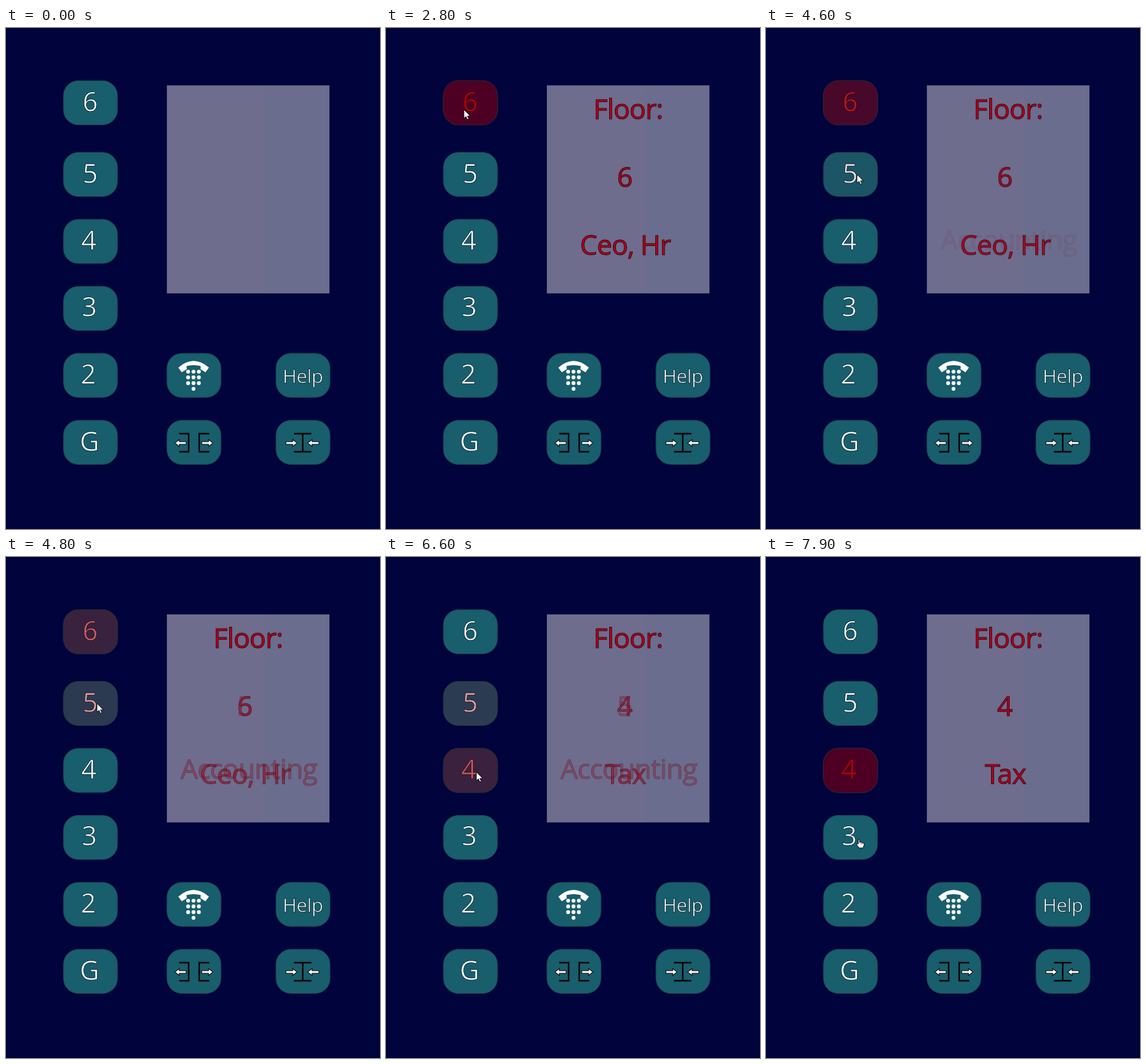
Recreate the animation shown at these times as an HTML page. Size 600 by 804 pixels, loop 8 s.

```html
<!DOCTYPE html>
<html lang="en">
<head>
<meta charset="utf-8">
<title>Lift panel</title>
<style>
  html, body { margin: 0; width: 100%; height: 100%; overflow: hidden; background: #01033c; }
  svg { display: block; width: 600px; height: 804px; }
  text { font-family: "Open Sans", "Noto Sans", sans-serif; text-anchor: middle; }
  .key { fill: #185e6c; stroke: #143c42; }
  .label { font-size: 43px; fill: #fff; stroke: #0c2a33; stroke-width: .8px; }
  .help { font-size: 31px; letter-spacing: -.6px; }
  .lit .key { fill: #4d0024; stroke: #302426; }
  .lit .label { fill: #b00606; stroke: #4d0018; }
  .info { font-size: 44px; letter-spacing: -.9px; fill: #b0001a; stroke: #3a0614; stroke-width: 1px; }
  .door { fill: none; stroke: #000; stroke-width: 2.4; }
  .arrow { fill: #fff; stroke: #111; stroke-width: 1.2; }
</style>
</head>
<body>
<svg viewBox="0 0 600 804">
  <defs>
    <linearGradient id="glass">
      <stop offset=".58" stop-color="#6e6d8e"/>
      <stop offset=".63" stop-color="#6a6d8d"/>
    </linearGradient>
    <path id="go" class="arrow" d="M0 -2.200H11V-5.500L18 0L11 5.500V2.200H0Z"/>
  </defs>
  <rect width="600" height="804" fill="#01033c"/>
  <rect x="258.5" y="92.5" width="260" height="333" fill="url(#glass)" stroke="#626282"/>
  <g id="keys"></g>
  <g id="info"></g>

  <g fill="#fff">
    <path d="M276.500 545Q301 523.500 325.500 545L320 552.500L312 547.500L312.500 542.500Q301 539.500 289.500 542.500L290 547.500L282 552.500Z"/>
    <g id="dots"></g>
  </g>
  <text class="label help" x="476" y="569.500">Help</text>

  <path class="door" d="M278 651H293V680H278M326 651H310V680H326"/>
  <use href="#go" transform="translate(289 666) scale(-1 1)"/>
  <use href="#go" transform="translate(314 666)"/>
  <path class="door" d="M462 651H490M476 651V680M462 680H490"/>
  <use href="#go" transform="translate(449 666)"/>
  <use href="#go" transform="translate(502 666) scale(-1 1)"/>

  <g id="cursor" stroke="#000" fill="#fff" stroke-linejoin="round">
    <path id="pointer" stroke-width=".9" d="M0 0V14L3.300 11L5.500 16L7.800 15L5.700 10.200H10Z"/>
    <g id="hand" transform="translate(2.500 1.500)">
      <path stroke-width="1" d="M3.500 8V1.600Q4.600 -.2 5.700 1.600V5.500Q7 4.300 8 5.700Q9.400 4.800 10.300 6.200Q12.500 5.500 12.800 7.500V10.500L11 14.500H5L1 9.500Q.3 7.300 2.300 7.600Z"/>
      <path fill="none" stroke-width=".6" d="M8 6V8.500M10.300 6.500V8.800"/>
    </g>
  </g>
</svg>
<script>
const LOOP = 8000, STEP = 100, FADE = 700;
const KEY_W = 87, KEY_H = 71;

// label, left, top, text centre, baseline
const keys = [
  ["6", 92, 84.5, 135, 134], ["5", 92, 199.5, 135, 248.5],
  ["4", 92, 307, 133, 355.5], ["3", 92, 414.5, 133.5, 463],
  ["2", 92, 522, 132, 570.5], ["G", 92, 629.5, 134, 678.5],
  ["", 258, 522, 0, 0], ["", 433, 522, 0, 0],
  ["", 258, 629.5, 0, 0], ["", 433, 629.5, 0, 0]
];

// start of fade, key index, department, text centre, baseline
const calls = [
  [2000, 0, "Ceo, Hr", 384, 364],
  [4540, 1, "Accounting", 389.5, 356],
  [6150, 2, "Tax", 384, 364]
];

// time, x, y
const route = [
  [100, 527, 657], [900, 133, 178], [1200, 125, 131],
  [2850, 125, 131], [3800, 146, 235],
  [5150, 146, 235], [5700, 145, 345],
  [7000, 145, 345], [7800, 142, 451]
];

const $ = id => document.getElementById(id);

function add(parent, tag, attrs, text = "") {
  const el = document.createElementNS("http://www.w3.org/2000/svg", tag);
  for (const name in attrs) el.setAttribute(name, attrs[name]);
  el.textContent = text;
  return parent.appendChild(el);
}

function addKey([label, x, y, cx, base], className = "") {
  const g = add($("keys"), "g", { class: className });
  add(g, "rect", { class: "key", x, y, width: KEY_W, height: KEY_H, rx: 24 });
  if (label) add(g, "text", { class: "label", x: cx, y: base }, label);
  return g;
}

function addInfo(parent, text, x, y) {
  add(parent, "text", { class: "info", x, y }, text);
}

keys.forEach(key => addKey(key));
const title = add($("info"), "g", {});
addInfo(title, "Floor:", 388.5, 146);
const floors = calls.map(([, index, name, cx, base]) => {
  const page = add($("info"), "g", {});
  addInfo(page, keys[index][0], 383, 255);
  addInfo(page, name, cx, base);
  return { page, lit: addKey(keys[index], "lit") };
});

for (let i = 0; i < 10; i++) {
  const col = i < 9 ? i % 3 : 1, row = Math.floor(i / 3);
  add($("dots"), "circle", { cx: 292.2 + col * 8.6, cy: 551.5 + row * 9.2, r: 3.1 });
}

const clamp = v => Math.max(0, Math.min(1, v));
const ease = v => v * v * (3 - 2 * v);

function cursorAt(t) {
  const next = route.findIndex(stop => stop[0] > t);
  if (next < 0) return route[route.length - 1].slice(1);
  const [t0, x0, y0] = route[next - 1], [t1, x1, y1] = route[next];
  const p = ease((t - t0) / (t1 - t0));
  return [x0 + (x1 - x0) * p, y0 + (y1 - y0) * p];
}

function draw(t) {
  const shown = calls.map(call => clamp((t - call[0]) / FADE));
  title.setAttribute("opacity", shown[0]);
  floors.forEach(({ page, lit }, i) => {
    const alpha = shown[i] * (1 - (shown[i + 1] || 0));
    page.setAttribute("opacity", alpha);
    lit.setAttribute("opacity", alpha);
  });

  const visible = t >= route[0][0];
  $("cursor").style.display = visible ? "" : "none";
  if (!visible) return;
  const [x, y] = cursorAt(t);
  const active = calls.filter(call => t >= call[0]).length - 1;
  const over = keys.findIndex(([, kx, ky]) =>
    x > kx && x < kx + KEY_W && y > ky && y < ky + KEY_H);
  const hand = over >= 0 && !(active >= 0 && calls[active][1] === over);
  $("cursor").setAttribute("transform", `translate(${x} ${y})`);
  $("hand").style.display = hand ? "" : "none";
  $("pointer").style.display = hand ? "none" : "";
}

const start = performance.now();
function tick() {
  const t = (performance.now() - start) % LOOP;
  draw(Math.floor(t / STEP) * STEP);
  requestAnimationFrame(tick);
}
tick();
</script>
</body>
</html>
```
